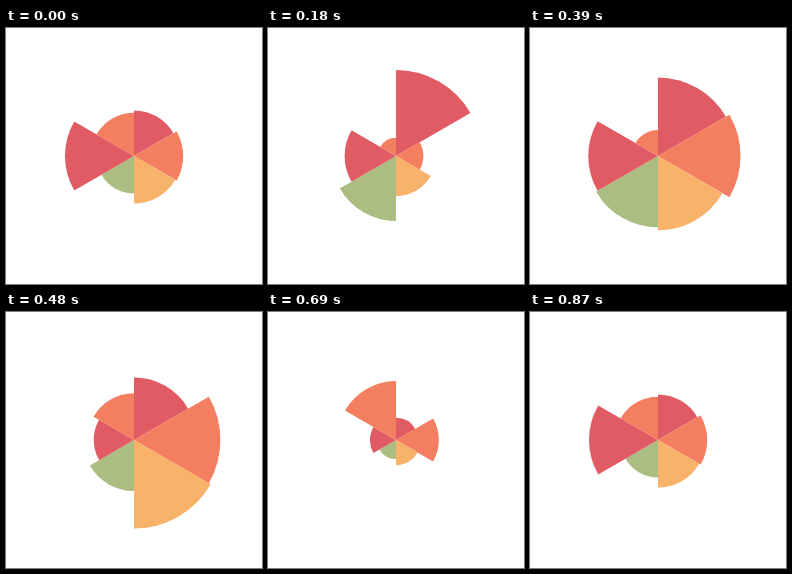
Write an HTML page that moves like this. It is 256 by 256 pixels and loops after 900 ms.

```html
<!DOCTYPE html>
<html lang="en">
<head>
<meta charset="utf-8">
<title>Rose chart loader</title>
<style>
  html, body { margin: 0; width: 100%; height: 100%; overflow: hidden; background: #fff; }
  svg { display: block; width: 100%; height: 100%; }
</style>
</head>
<body>
<svg id="stage" viewBox="0 0 256 256"></svg>
<script>
const LOOP = 900, STEP = 30, LAST = LOOP / STEP - 1;
const CENTER = 128, SWEEP = Math.PI / 3;
const RED = '#e15b64', ORANGE = '#f47e60', YELLOW = '#f8b26a', GREEN = '#abbd81';

// Clockwise from the top; radii are evenly spaced over the loop.
const wedges = [
  { color: RED, radii: [45.5, 94.4, 74.3, 17.4] },
  { color: ORANGE, radii: [49.2, 22.8, 98.1, 41.5] },
  { color: YELLOW, radii: [47.6, 43.3, 30.2, 94.2, 76.2, 8.9] },
  { color: GREEN, radii: [37.6, 64.3, 81, 41.4, 18.3] },
  { color: RED, radii: [69, 50.2, 83.5, 26.5, 26] },
  { color: ORANGE, radii: [43.2, 23.1, 2.6, 36.5, 69.3, 55.7] }
];

const stage = document.getElementById('stage');
for (const w of wedges) {
  w.path = document.createElementNS('http://www.w3.org/2000/svg', 'path');
  w.path.setAttribute('fill', w.color);
  stage.appendChild(w.path);
}

function radiusAt(radii, u) {
  const n = radii.length, x = u * n, i = Math.floor(x);
  const from = radii[i % n], to = radii[(i + 1) % n];
  return from + (to - from) * (x - i);
}

function rim(angle, r) {
  const x = CENTER + r * Math.sin(angle), y = CENTER - r * Math.cos(angle);
  return x.toFixed(3) + ' ' + y.toFixed(3);
}

function draw(ms) {
  const u = Math.floor((ms % LOOP) / STEP) / LAST;
  wedges.forEach((w, i) => {
    const r = radiusAt(w.radii, u), a = i * SWEEP;
    w.path.setAttribute('d',
      `M${CENTER} ${CENTER}L${rim(a, r)}A${r} ${r} 0 0 1 ${rim(a + SWEEP, r)}Z`);
  });
}

const start = performance.now();
function tick() {
  draw(performance.now() - start);
  requestAnimationFrame(tick);
}
tick();
</script>
</body>
</html>
```
